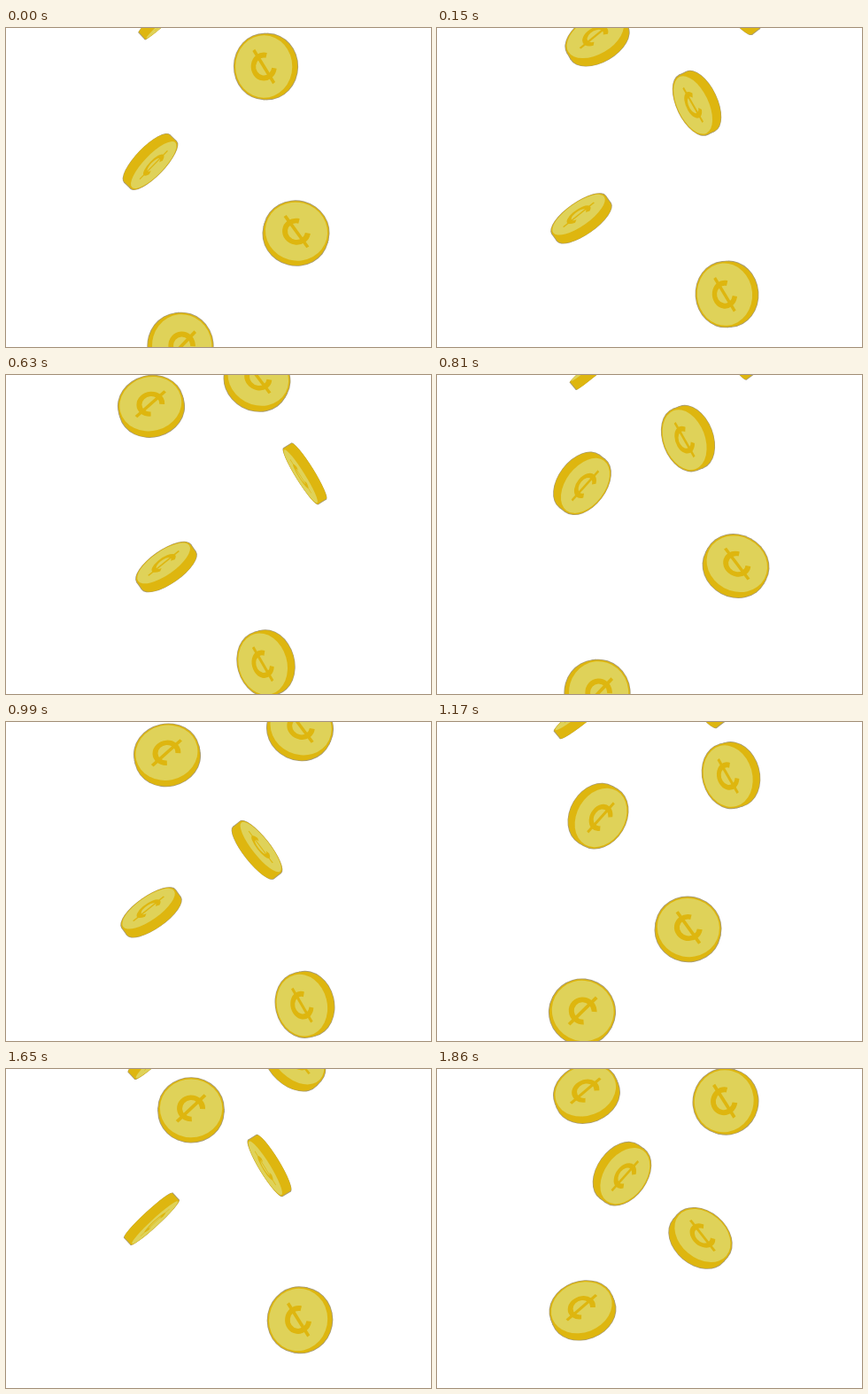
Animation, 480 px wide and 360 px high, one loop 1890 ms. Source, as an HTML page with a canvas:

```html
<!DOCTYPE html>
<html>
<head>
<meta charset="utf-8">
<style>
html, body { margin: 0; width: 100%; height: 100%; overflow: hidden; background: #fff; }
canvas { display: block; }
</style>
</head>
<body>
<canvas id="stage" width="480" height="360"></canvas>
<script>
const ctx = document.getElementById('stage').getContext('2d');
const GOLD = '#deb60f', FACE = '#dfd259', EDGE = '#a89b72';
const LOOP = 1890, TOP = -50, FLOOR = 375, HALF_THICK = 5.5;

// Every coin falls and tumbles by the rule of its side; drops lists [x, starting step].
const sides = [
  {
    speed: 1.05, spin: .345, facing: 10.6, axis: 49, turn: 45,
    drops: [[197, -19.25], [163, -13.5], [181, -5.55], [164, 1.2],
            [182, 7.8], [164.5, 13.6], [209, 18.35], [169, 22.3]]
  },
  {
    speed: .97, spin: .355, facing: 8.7, axis: 146, turn: -34,
    drops: [[327.5, -17.3], [293.5, -9.97], [337.5, -3.1], [283.5, 2.33],
            [332, 8.88], [297.5, 14.7], [326, 21.1]]
  }
];
const LEAN = .25;
const rad = deg => deg * Math.PI / 180;

function ellipse(x, rx, ry, color) {
  ctx.fillStyle = color;
  ctx.beginPath();
  ctx.ellipse(x, 0, rx, ry, 0, 0, 7);
  ctx.fill();
}

function body(r, squash, d, color) {
  ellipse(-d, r * squash, r, color);
  ellipse(d, r * squash, r, color);
  ctx.fillRect(-d, -r, 2 * d, 2 * r);
}

function sign(turn) {
  const gap = .73;
  ctx.rotate(rad(turn));
  ctx.strokeStyle = GOLD;
  ctx.lineWidth = 6;
  ctx.beginPath();
  ctx.arc(0, 0, 13, gap, 2 * Math.PI - gap);
  ctx.stroke();
  ctx.lineWidth = 3.8;
  ctx.beginPath();
  ctx.moveTo(0, -22.5);
  ctx.lineTo(0, 22.5);
  ctx.stroke();
}

// Projected normal of the visible face: a swing along the axis plus a small upward lean.
function faceNormal({ spin, facing, axis }, fall) {
  const a = spin * (fall - facing), u = rad(axis);
  const flip = Math.sign(Math.cos(a));
  const swing = flip * Math.sin(a), lean = LEAN * Math.abs(Math.cos(a));
  const up = -Math.sign(Math.cos(u));
  return [
    swing * Math.cos(u) - up * lean * Math.sin(u),
    swing * Math.sin(u) + up * lean * Math.cos(u)
  ];
}

function drawCoin(side, x, y, fall) {
  const [nx, ny] = faceNormal(side, fall);
  const tilt = Math.min(.998, Math.hypot(nx, ny));
  const squash = Math.sqrt(1 - tilt * tilt);
  const dir = Math.atan2(ny, nx), d = HALF_THICK * tilt;

  ctx.save();
  ctx.translate(x, y);
  ctx.rotate(dir);
  body(37.7, squash, d, EDGE);
  body(36.8, squash, d, GOLD);
  ellipse(d, 35.2 * squash, 35.2, FACE);
  ctx.translate(d, 0);
  ctx.scale(squash, 1);
  ctx.rotate(-dir);
  sign(side.turn);
  ctx.restore();
}

// Motion advances in 60 ms steps and skips part of a beat once.
function stepAt(t) {
  const step = t < 1860 ? Math.max(0, Math.min(29, Math.floor((t - 30) / 60))) : 30;
  return step > 11 ? step + .7 : step;
}

function draw() {
  const step = stepAt(performance.now() % LOOP);
  ctx.clearRect(0, 0, 480, 360);
  for (const side of sides) {
    for (const [x, start] of side.drops) {
      const fall = side.speed * (step - start);
      const y = TOP + fall * fall;
      if (fall > 0 && y < FLOOR) drawCoin(side, x, y, fall);
    }
  }
  requestAnimationFrame(draw);
}
draw();
</script>
</body>
</html>
```
